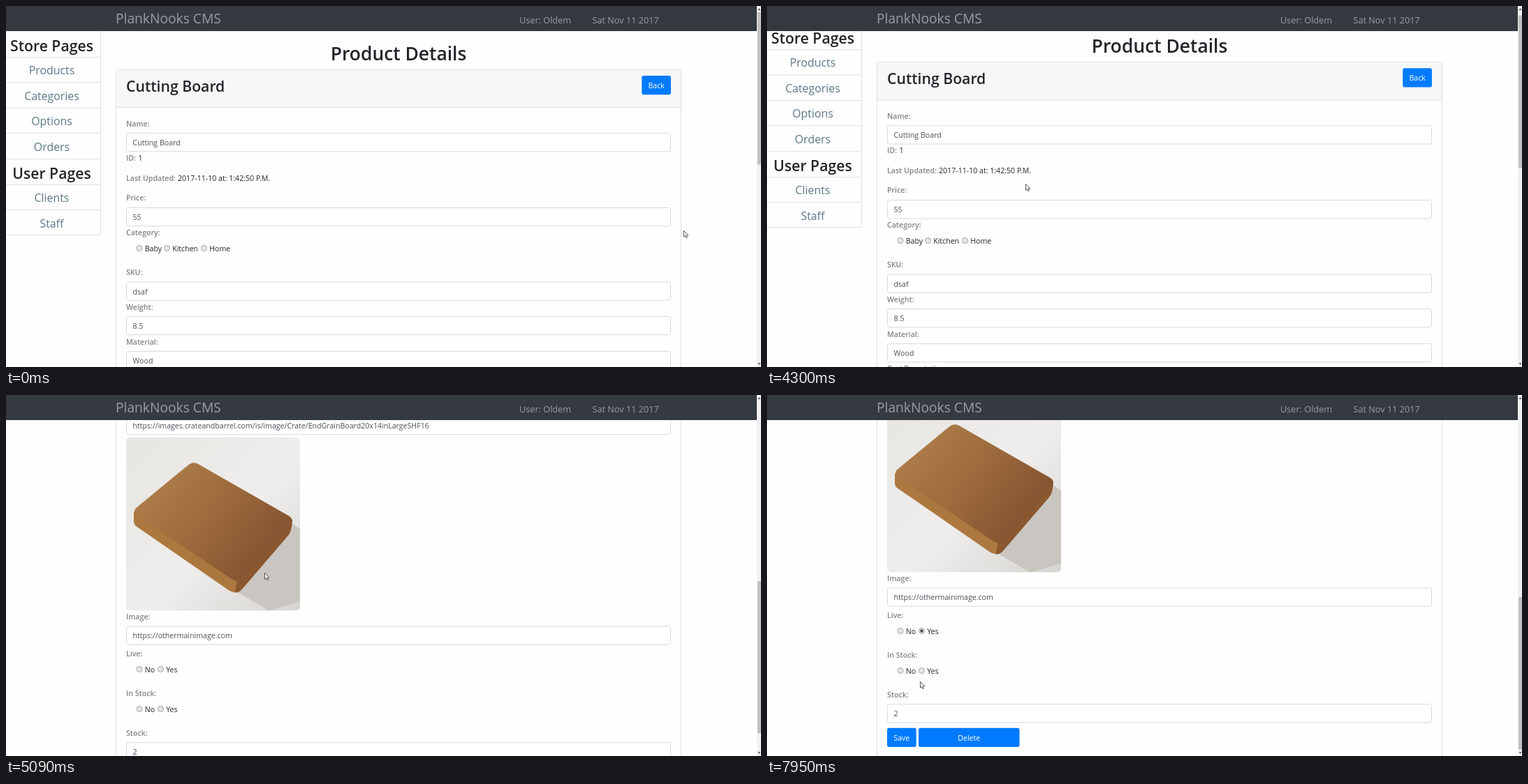
Recreate the animation shown at these times as an HTML page. Size 1081x518 px, loop 8 s.

```html
<!DOCTYPE html>
<html lang="en">
<head>
<meta charset="utf-8">
<title>Product Details</title>
<style>
  html, body { margin: 0; width: 100%; height: 100%; overflow: hidden; background: #fefefe; }
  svg { display: block; width: 1081px; height: 518px; }
  text { font: 10.6px "Open Sans", "Noto Sans", sans-serif; fill: #212529; }
  .label { font-weight: 600; fill: #7f8486; }
  .value { fill: #495057; }
  .link { font-size: 15.9px; fill: #5b7886; }
  .h1 { font-size: 26.4px; font-weight: 600; }
  .h2 { font-size: 21.2px; font-weight: 600; }
  .brand { font-size: 19.2px; fill: #9a9da0; }
  .info { font-size: 12.7px; fill: #9a9da0; }
  .white { fill: #fff; }
  .mid { text-anchor: middle; }
  .line { fill: none; stroke: #dedfdf; }
  .input { fill: #fff; stroke: #d6d9db; }
  .button { fill: #007bff; }
  .radio { fill: #e6e6e6; stroke: #a3a3a3; }
</style>
</head>
<body>
<svg viewBox="0 0 1081 518">
  <defs>
    <linearGradient id="marble" x2="1" y2="1">
      <stop offset="0" stop-color="#e6e5e1"/>
      <stop offset=".55" stop-color="#efeeec"/>
      <stop offset="1" stop-color="#d6d4d0"/>
    </linearGradient>
    <linearGradient id="wood" x2="1" y2=".6">
      <stop offset="0" stop-color="#b3834f"/>
      <stop offset=".5" stop-color="#9f6d3d"/>
      <stop offset="1" stop-color="#835230"/>
    </linearGradient>
  </defs>
  <g id="page">
    <path class="line" d="M0 73.5H135M0 109.5H135M0 146.5H135M0 182.5H135M0 219.5H135M0 256.5H135M0 292.5H135M135.5 36V325.500a3 3 0 0 1-3 3H0"/>
    <rect class="line" x="157.500" y="91.500" width="809" height="1140" rx="3"/>
    <path d="M158 145V94.500a2.500 2.500 0 0 1 2.500-2.500H963.500a2.500 2.500 0 0 1 2.500 2.500V145Z" fill="#f6f7f7"/>
    <path class="line" d="M158 145.500H966"/>
    <svg x="172" y="674.500" width="249" height="249">
      <rect width="249" height="249" rx="6" fill="url(#marble)"/>
      <path d="M238 124L249 132V236L205 249L160 223Z" fill="#c9c6c1"/>
      <path d="M11 107V121Q11 126 16 129L146 219Q158 227 166 218L232 141Q237 136 238 118L160 195Z" fill="#ad783f"/>
      <path d="M238 118Q237 136 232 141L166 218Q162 223 156 223L159 204Z" fill="#8a572f"/>
      <path d="M89 40Q96 34 104 39L233 113Q241 118 235 125L168 202Q160 210 150 203L16 113Q8 107 15 101Z" fill="url(#wood)"/>
    </svg>
  </g>
  <rect width="1075" height="36" fill="#343a40"/>
  <g id="nav"></g>
  <rect x="1075" width="6" height="518" fill="#f1f1f1"/>
  <path d="M1076.500 6l2-3 2 3ZM1076.500 512l2 3 2-3Z" fill="#606060"/>
  <rect id="thumb" x="1076" width="5" height="218.500" fill="#c1c1c1"/>
  <path id="cursor" d="M.5 .5V9.300L2.500 7.500 4 10.700 5.400 10.100 4 7H6.900Z" fill="#fff" stroke="#333" stroke-width=".8"/>
</svg>
<script>
const $ = id => document.getElementById(id);
const page = $('page'), nav = $('nav');

function add(parent, tag, attrs, text = '') {
  const el = document.createElementNS('http://www.w3.org/2000/svg', tag);
  for (const key in attrs) el.setAttribute(key, attrs[key]);
  el.textContent = text;
  parent.append(el);
  return el;
}
const write = (text, x, y, style = '', parent = page) =>
  add(parent, 'text', { x, y, class: style }, text);
const box = (style, x, y, width, height) =>
  add(page, 'rect', { class: style, x, y, width, height, rx: 2.8 });

function field(label, labelY, value, top) {
  write(label + ':', 172, labelY, 'label');
  box('input', 172.5, top + .5, 779, 26.3);
  write(value, 181.5, top + 18, 'value');
}
function button(text, x, y, width) {
  box('button', x, y, width, 27.3);
  write(text, x + width / 2, y + 18, 'white mid');
}
function radios(label, labelY, options) {
  write(label + ':', 172, labelY, 'label');
  return options.map(([text, x]) => {
    write(text, x + 7.7, labelY + 22.8);
    return add(page, 'circle', { class: 'radio', cx: x, cy: labelY + 18.5, r: 4 });
  });
}

write('PlankNooks CMS', 157, 25, 'brand', nav);
write('User: Oldem', 735, 24.7, 'info', nav);
write('Sat Nov 11 2017', 839.5, 24.7, 'info', nav);

['Store Pages', 'Products', 'Categories', 'Options', 'Orders', 'User Pages', 'Clients', 'Staff']
  .forEach((text, i) => {
    const heading = i % 5 == 0;
    write(text, 65.5, (heading ? 65 : 61.4) + i * 36.6, heading ? 'h2 mid' : 'link mid');
  });

write('Product Details', 562, 77.6, 'h1 mid');
write('Cutting Board', 172, 122.7, 'h2');
button('Back', 910.3, 100, 41.7);

field('Name', 173, 'Cutting Board', 182);
write('ID:', 172, 222, 'label');
write('1', 189.5, 222);
write('Last Updated:', 172, 251, 'label');
write('2017-11-10 at: 1:42:50 P.M.', 246, 251);
field('Price', 279, '55', 289);
radios('Category', 329, [['Baby', 191], ['Kitchen', 230.5], ['Home', 283.5]]);
field('SKU', 386, 'dsaf', 395.5);
field('Weight', 436, '8.5', 445);
field('Material', 485.7, 'Wood', 495);
field('Cart Description', 535, 'Wood Cuttingboard', 544.5);
field('Description', 585, 'Wood cuttingboard perfect for cutting things and doing stuff with it like knifes and food fruite vegetables hot cold, organic cat-free', 594);
field('Thumb', 634.5, 'https://images.crateandbarrel.com/is/image/Crate/EndGrainBoard20x14inLargeSHF16', 644);
field('Image', 936, 'https://othermainimage.com', 945.3);
const choice = [['No', 191], ['Yes', 221.5]];
const live = radios('Live', 989, choice)[1];
radios('In Stock', 1046, choice);
field('Stock', 1103, '2', 1112.3);
button('Save', 172, 1146.7, 41.7);
button('Delete', 217, 1146.7, 144.5);
const dot = add(page, 'circle', { cx: 221.5, cy: 1007.5, r: 2.2, fill: '#505050' });

// Pointer tip: time, x, y
const path = [
  [0, 970, 322], [510, 970, 322], [900, 640, 262], [1200, 370, 230], [1360, 307, 223],
  [1520, 260, 234], [1640, 242, 250], [1850, 330, 264], [2000, 375, 245], [2120, 340, 228],
  [2200, 300, 238], [2360, 340, 262], [2520, 404, 260], [2640, 350, 232], [2774, 254, 225.5],
  [2960, 222, 245], [3080, 250, 260], [3220, 222, 246], [3400, 300, 236], [3560, 350, 243],
  [3720, 370, 255], [5590, 370, 255], [5900, 315, 284], [6280, 222, 338], [6480, 222, 338],
  [6700, 212, 346], [6880, 218, 350], [7050, 220, 341], [7570, 220, 341], [7900, 219, 411]
];
// Wheel scrolling: time, offset
const scrolls = [
  [0, 0], [4300, 10.8], [4400, 130], [4480, 235], [4550, 280],
  [4930, 301.3], [5010, 468], [5090, 614], [5180, 660], [5240, 669]
];

function pointerAt(t) {
  const i = path.findIndex(key => key[0] > t);
  if (i < 0) return path.at(-1).slice(1);
  const [t0, x0, y0] = path[i - 1], [t1, x1, y1] = path[i];
  const f = (t - t0) / (t1 - t0);
  return [x0 + (x1 - x0) * f, y0 + (y1 - y0) * f];
}

function draw() {
  const t = performance.now() % 8000;
  const stepped = Math.max(0, 590 + Math.floor((t - 590) / 78) * 78);
  const scroll = scrolls.findLast(key => key[0] <= t)[1];
  page.setAttribute('transform', `translate(0 ${-scroll})`);
  $('thumb').setAttribute('y', 9 + scroll * .42);
  $('cursor').setAttribute('transform', `translate(${pointerAt(stepped)})`);
  live.style.fill = t >= 7240 && t < 7330 ? '#c4c4c4' : '';
  dot.style.display = t >= 7330 ? '' : 'none';
  requestAnimationFrame(draw);
}
draw();
</script>
</body>
</html>
```
